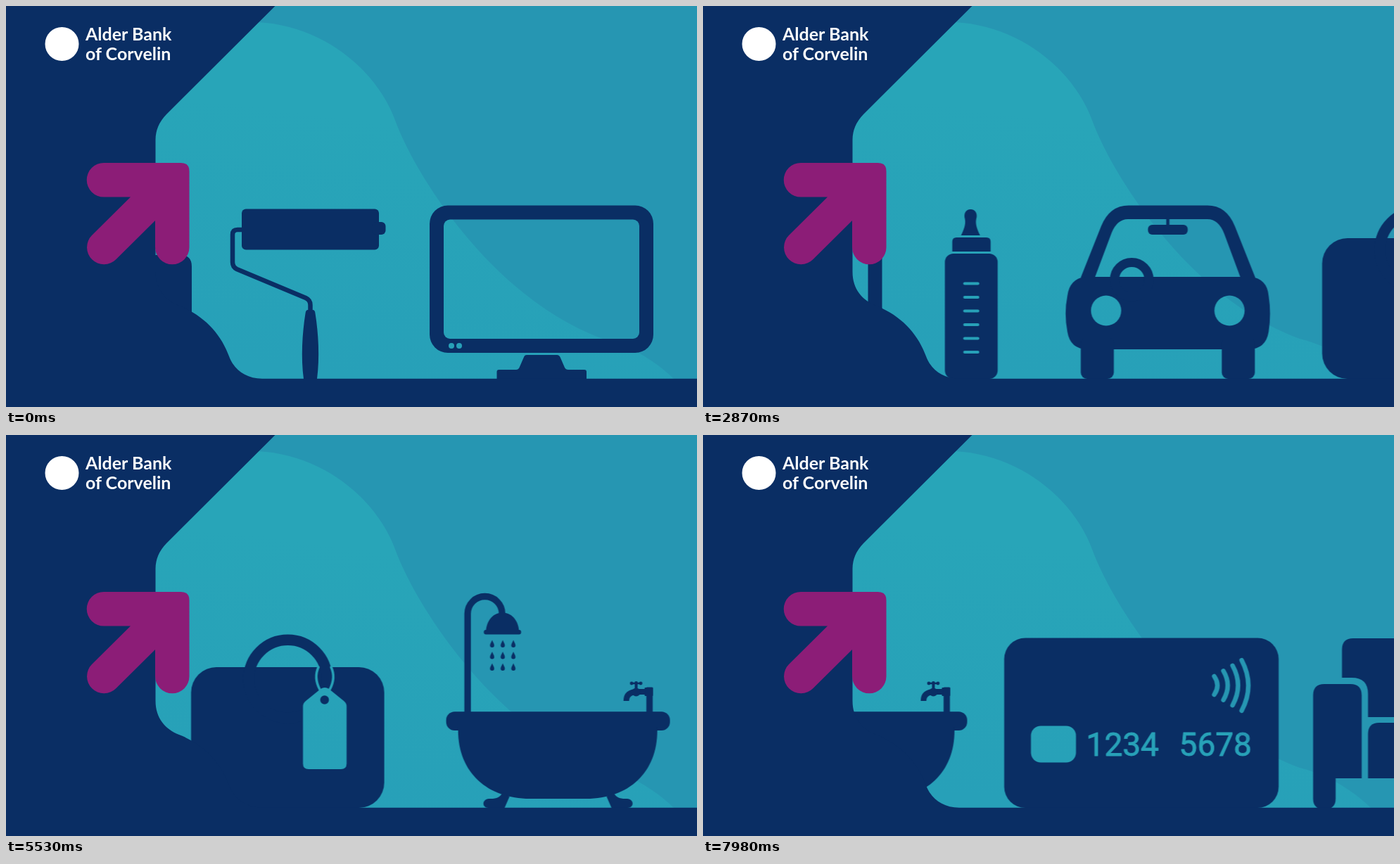
Recreate the animation shown at these times as an HTML page. Size 982x570 px, loop 8000 ms.

```html
<!DOCTYPE html>
<html lang="en">
<head>
<meta charset="utf-8">
<title>Conveyor of purchases</title>
<style>
  html, body { margin: 0; height: 100%; overflow: hidden; background: #0a2e64; }
  svg { display: block; width: 100vw; height: 100vh; }
  .navy { fill: #0a2e64; }
  .line { fill: none; stroke: #0a2e64; }
  .cut { fill: none; stroke: #000; stroke-linecap: round; }
  .name { font: 700 25px Lato, sans-serif; fill: #fff; }
  .digits { font: 400 46px Roboto, sans-serif; stroke: #000; stroke-width: 0.9; stroke-linejoin: round; }
</style>
</head>
<body>
<svg viewBox="0 0 982 570">
  <defs>
    <linearGradient id="teal" x1="0.6" y1="0" x2="0.4" y2="1">
      <stop offset="0.3" stop-color="#28a5b8"/>
      <stop offset="1" stop-color="#27a0b8"/>
    </linearGradient>
    <mask id="holes" maskUnits="userSpaceOnUse" x="-1000" y="0" width="4200" height="570">
      <rect x="-1000" width="4200" height="570" fill="#fff"/>
      <g id="cutouts"></g>
    </mask>
  </defs>

  <rect width="982" height="570" fill="#2696b2"/>
  <path fill="url(#teal)" d="M200,23H358C452,28 528,92 554,165C582,240 690,415 848,473
    C885,482 920,502 949,530H200Z"/>

  <g id="belt" class="navy" mask="url(#holes)"></g>

  <path class="navy" d="M0,0H382.5L228,154Q212.5,170 212.5,190V378C212.5,402 226,418 246,426
    C282,440 306,467 317,498C324,517 341,529.7 364,529.7H982V570H0Z"/>
  <path fill="#8c1d77" d="M139,223H248.500Q260.500,223 260.500,235V343A24.200,24.200 0 0 1 212,343V305
    L156.500,360A24.200,24.200 0 0 1 122,326L177,271.500H139A24.200,24.200 0 0 1 139,223Z"/>
  <circle cx="79.500" cy="54" r="24" fill="#fff"/>
  <text class="name" x="113" y="49">Alder Bank</text>
  <text class="name" x="113" y="77">of Corvelin</text>
</svg>

<script>
const LOOP = 8000, STEP = 70, SPEED = 0.2319; // ms, ms, px per ms

const path = d => `<path d="${d}"/>`;
const box = (x1, y1, x2, y2, r = 0) =>
  `<rect x="${x1}" y="${y1}" width="${x2 - x1}" height="${y2 - y1}" rx="${r}"/>`;
const dot = (x, y, r) => `<circle cx="${x}" cy="${y}" r="${r}"/>`;
const line = (d, width) => `<path class="line" stroke-width="${width}" d="${d}"/>`;
const ring = (x, y, r, width) =>
  `<circle class="line" stroke-width="${width}" cx="${x}" cy="${y}" r="${r}"/>`;
const cut = (d, width) => `<path class="cut" stroke-width="${width}" d="${d}"/>`;
const moved = (x, y, shape) => `<g transform="translate(${x} ${y})">${shape}</g>`;
// The shape together with its mirror image about the vertical axis x
const paired = (x, shape) =>
  shape + `<g transform="translate(${2 * x} 0) scale(-1 1)">${shape}</g>`;
const times = (n, draw) => Array.from({ length: n }, (_, i) => draw(i)).join('');

const roller = {
  solid:
    box(335, 288.5, 530, 346.5, 6) + box(520, 307, 539.5, 325, 6) +
    line('M338,318H329Q322,318 322,325V364Q322,371 328,374L426,415Q432.500,418 432.500,425V436', 6.5) +
    path('M429,432H436Q439,432 439.500,437C444,465 446,500 442,530H423C419,500 421,465 425.500,437Q426,432 429,432Z'),
  holes: ''
};

const monitor = {
  solid:
    box(602, 283.5, 920, 493, 26) +
    path('M740,496H783Q786,496 787.500,499L794,514Q795.500,517 799,517H822Q825,517 825,520V530' +
         'H697.500V520Q697.500,517 700.500,517H725Q728,517 729.500,514L736,499Q737,496 740,496Z'),
  holes: box(622, 303.5, 900, 473, 9) + dot(633, 483, 4) + dot(644, 483, 4)
};

const bottle = {
  solid:
    box(782, 352, 857, 530, 12) +
    path('M792.500,349V335Q792.500,329 798.500,329H841Q847,329 847,335V349Z') +
    path('M805,326C809,318 812,310 810.500,303C808,295 812,289 818.500,289S829,295 826.500,303C825,310 828,318 832,326Z'),
  holes: times(6, i => cut(`M810,${394.5 + 19.5 * i}H829`, 3.8))
};

const car = {
  solid:
    path('M342,386L371,313Q383,283.500 410,283.500H522Q549,283.500 561,313L590,386H569L546,324' +
         'Q538,303 522,303H409Q394,303 386,322L362,386Z') +
    path('M348,385H584Q607,388 609,412Q613,437 609,463Q605,488 580,488H352' +
         'Q327,488 323,463Q318,437 323,412Q326,388 348,385Z') +
    paired(465.7, box(342, 470, 389, 530, 9)) +
    box(463.5, 300, 468, 313) + box(437.5, 311, 494, 325, 6) +
    ring(414.5, 389, 24.5, 13),
  holes: paired(465.7, dot(378, 433, 21.5))
};

const suitcase = {
  solid: box(263, 330, 537.5, 530, 36) + ring(400.5, 346.8, 55.5, 15.5),
  holes:
    path('M447,361Q453,357 459,361L480,378Q484,381 484,386V467Q484,475 476,475H430' +
         'Q422,475 422,467V386Q422,381 426,378Z') +
    `<g fill="#fff">${dot(452.7, 376.5, 6.2)}</g>` +
    paired(453, cut('M444,330Q437,345 446,362', 3.5))
};

const drop = path('M0,0C1,3 3,5 3,7.500A3,3 0 0 1 -3,7.500C-3,5 -1,3 0,0Z');
const bath = {
  solid: moved(-0.5, 0,
    box(626, 393.3, 944, 420, 12) +
    path('M643,415V420C643,480 685,517 745,517H825C885,517 926,480 926,420V415Z') +
    paired(785, path('M716,514L709,530H686C677,530 676,518 687,517C697,517.500 703,515 706,508Z')) +
    line('M656.500,395V254A24.500,24.500 0 0 1 705.500,254V257', 9.3) +
    path('M682.500,278C684,262 694,252.500 706,252.500S728,262 729.500,278Z') +
    box(679.5, 277, 732.5, 283.5, 3) +
    times(9, i => moved(691.3 + 15.1 * (i % 3), 291.5 + 16.5 * Math.floor(i / 3), drop)) +
    box(910.5, 358.5, 919.5, 395, 1) + box(908, 359, 920, 371, 1) +
    line('M910,365H898Q882,365 882,378', 8) + dot(896, 365.5, 6) +
    line('M896,353V363', 4) + line('M889,353H903', 2.5) +
    dot(889.5, 353, 2.4) + dot(902.5, 353, 2.4) + dot(896, 352.5, 2.4)),
  holes: ''
};

const card = {
  solid: box(428, 288.5, 818, 530, 30),
  holes:
    box(466, 413.5, 530, 465.5, 14) +
    '<text class="digits" x="544.5" y="456">1234</text>' +
    '<text class="digits" x="676.5" y="456">5678</text>' +
    times(4, i => {
      const x = 726.5 + 13 * i, reach = 13 + 7.6 * i;
      return cut(`M${x},${356 - reach}Q${x + 9 + 3.3 * i},356 ${x},${356 + reach}`, 6.5);
    })
};

const armchair = {
  solid:
    path('M908,345V305Q908,289 924,289H1100Q1116,289 1116,305V345H1102Q1079,345 1079,368V401' +
         'H945V368Q945,345 922,345Z') +
    path('M945,488V425Q945,409 961,409H1063Q1079,409 1079,425V488Z') +
    paired(1012, path('M867,370Q867,354 883,354H920Q936,354 936,370V488H899V517Q899,532 883,532Q867,532 867,517Z')),
  holes: ''
};

// Each thing with the moment (ms) at which it stands at its drawn coordinates
const parade = [
  [armchair, -3851], [roller, 0], [monitor, 0], [bottle, 980], [car, 3710],
  [suitcase, 5530], [bath, 5530], [card, 7980], [armchair, 7980]
];
const layOut = part => parade.map(([thing, ms]) => moved(ms * SPEED, 0, thing[part])).join('');

const belt = document.getElementById('belt');
belt.innerHTML = layOut('solid');
document.getElementById('cutouts').innerHTML = layOut('holes');

const start = performance.now();
function draw(now) {
  const time = Math.max(0, now - start) % LOOP;
  const shift = Math.floor(time / STEP) * STEP * SPEED;
  belt.setAttribute('transform', `translate(${-shift} 0)`);
  requestAnimationFrame(draw);
}
draw(start);
</script>
</body>
</html>
```
